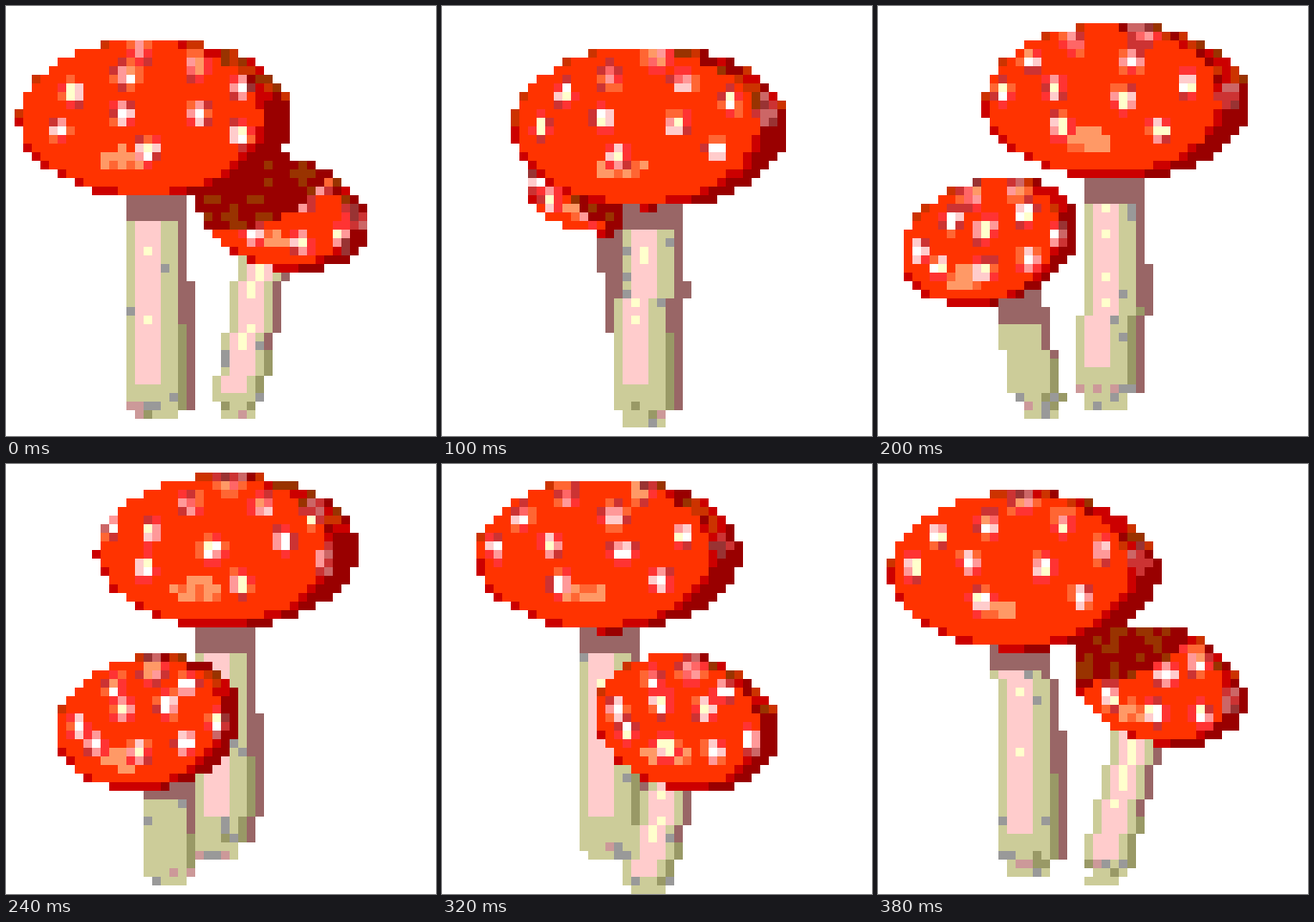
An HTML page with a canvas for the animation above (400 ms loop, 500 px wide and 500 px high).

```html
<!DOCTYPE html>
<html lang="en">
<head>
<meta charset="utf-8">
<title>Turning mushrooms</title>
<style>
  html, body { margin: 0; width: 100%; height: 100%; overflow: hidden; background: #fff; }
  canvas { display: block; }
</style>
</head>
<body>
<canvas id="stage" width="500" height="500"></canvas>
<script>
const ctx = document.getElementById('stage').getContext('2d');
const CELL = 10, GRID = 50, STEPS = 20, STEP_MS = 20;
const TURN = 2 * Math.PI;

// Evenly spaced spots around a cap, seen slightly from above
const ring = (count, phase, radius, height, depth) =>
  Array.from({ length: count }, (_, i) => ({ turn: phase + i / count, radius, height, depth }));
const bigSpots = [...ring(7, -.01, 13.5, -2.2, 6), ...ring(7, .085, 10, -4.2, 4), ...ring(3, -.11, 5, -6.4, 1.7)];
const smallSpots = [...ring(9, .04, 8.3, -.4, 3.7), ...ring(5, .08, 4.5, -3.7, 2.3)];

function noise(x, y, seed) {
  const n = Math.sin(x * 12.99 + y * 78.23 + seed * 37.7) * 43758.55;
  return n - Math.floor(n);
}

const pick = (colours, n) => colours[Math.floor(n * colours.length)];

function cell(x, y, colour) {
  ctx.fillStyle = colour;
  ctx.fillRect(x * CELL, y * CELL, CELL, CELL);
}

function capColour(u, v, n) {
  const q = ((u + .1) / .87) ** 2 + ((v + .02) / .94) ** 2;
  if (q < 1) return '#f30';
  if (u < 0) return v < 0 ? '#c30' : '#c00';
  if (v < -.25) return pick(['#930', '#c00', '#900', '#c30'], n);
  return q < 1.12 ? '#c00' : '#900';
}

function spotColour(d, v, onRim, n) {
  if (onRim) return pick(['#c66', '#933', '#c33'], n);
  if (v < -.55) return d < 1 ? pick(['#f96', '#f99', '#f66'], n) : pick(['#f33', '#c33', '#f63'], n);
  if (d < .8) return pick(['#fff', '#ffc'], n);
  if (d < 1.2) return pick(['#fcc', '#f99'], n);
  return pick(['#f63', '#f33', '#f33', '#c33'], n);
}

function drawCap(cap, step) {
  const spots = cap.spots.flatMap(({ turn, radius, height, depth }) => {
    const a = TURN * (turn + step / STEPS), front = Math.cos(a);
    if (radius > .6 * cap.rx && front < -.15) return [];
    return [{ x: radius * Math.sin(a), y: height + depth * front }];
  });
  for (let y = 0; y < GRID; y++) for (let x = 0; x < GRID; x++) {
    const dx = x + .5 - cap.x, dy = y + .5 - cap.y - cap.tilt * dx;
    const u = dx / cap.rx, v = dy / cap.ry;
    if (u * u + v * v > 1) continue;
    const n = noise(x, y, step);
    if (cap.shadow?.(x + .5, y + .5)) {
      cell(x, y, n < .3 ? '#930' : '#900');
      continue;
    }
    let colour = capColour(u, v, n);
    const onRim = colour !== '#f30';
    const glint = Math.hypot((u + .22) * cap.rx / 3, (v - .5) * cap.ry / 1.3);
    if (glint < 1) colour = n < .75 ? '#f96' : '#f63';
    for (const s of spots) {
      const squash = 1 - .4 * Math.abs(s.x) / cap.rx;
      const d = Math.hypot((dx - s.x) / squash, dy - s.y);
      if (d < 1.8) { colour = spotColour(d, v, onRim, n); break; }
    }
    cell(x, y, colour);
  }
}

function stalkColour(s, u, f, rowsLeft, n) {
  if (s.dark) return '#966';
  if (rowsLeft < 2.5 && n < .35) return pick(['#999', '#c99', '#996'], n / .35);
  if (u > .86) return f > .6 ? '#996' : '#966';
  if ((u < .16 || u > .64) && n > .94) return '#999';
  if (s.green || f > .84 || u < .16 || u > .64) return '#cc9';
  return u < .5 && u > .25 && f < .6 && n < s.flecks ? '#ffc' : '#fcc';
}

function drawStalk(s, step) {
  for (let y = Math.floor(s.top); y < s.bottom; y++) {
    const f = (y - s.top) / (s.bottom - s.top), rowsLeft = s.bottom - y;
    const left = Math.round(s.x0 + (s.x1 - s.x0) * f - s.width / 2);
    const inset = rowsLeft < 1.5 ? 1 : 0;
    for (let i = inset; i < s.width - inset; i++) {
      const colour = stalkColour(s, (i + .5) / s.width, f, rowsLeft, noise(left + i, y, step));
      cell(left + i, y, y < s.shade ? '#966' : colour);
    }
    if (s.cast && f > .42 && f < .95) cell(left + s.width, y, '#966');
  }
}

function draw(step) {
  const wave = offset => Math.cos(TURN * (step + offset) / STEPS);
  const side = wave(1), near = wave(-14), bigNear = wave(-3.5);
  const big = {
    x: 22.5 - 5.5 * side, y: 12.1 + 2.2 * bigNear,
    rx: 15.7 + .5 * bigNear, ry: 9.2 + .3 * bigNear, tilt: 0, spots: bigSpots
  };
  const small = {
    x: 22.6 + 10.1 * side, y: 25.7 + 5.4 * near,
    rx: 10.1 + .8 * near, ry: 7 + 1.1 * near, tilt: .16 * side, spots: smallSpots
  };
  const behind = near < .05;
  if (behind) {
    small.shadow = (x, y) =>
      ((x - big.x - 5) / big.rx) ** 2 + ((y - big.y - 4) / big.ry) ** 2 < 1;
  }
  const bigStalk = {
    x0: 22.6 - 5.8 * side, x1: 22.2 - 4.4 * side, width: 7,
    top: big.y + 6, bottom: 46.8 + 1.7 * bigNear, shade: big.y + 11.3,
    flecks: .22, cast: true
  };
  const smallStalk = {
    x0: 23 + 7.5 * side, x1: 22.8 + 3.9 * wave(-.5), width: 6,
    top: small.y + 4, bottom: 47.3 + 2.7 * wave(-15),
    shade: small.y + small.ry - .2 - 1.8 * side,
    flecks: .6, dark: wave(-3) > .75, green: near - side > .6
  };
  const parts = [[smallStalk, small], [bigStalk, big]];
  if (!behind) parts.reverse();

  ctx.fillStyle = '#fff';
  ctx.fillRect(0, 0, 500, 500);
  for (const [stalk, cap] of parts) {
    drawStalk(stalk, step);
    drawCap(cap, step);
  }
}

function tick() {
  draw(Math.floor(performance.now() / STEP_MS) % STEPS);
  requestAnimationFrame(tick);
}
tick();
</script>
</body>
</html>
```
